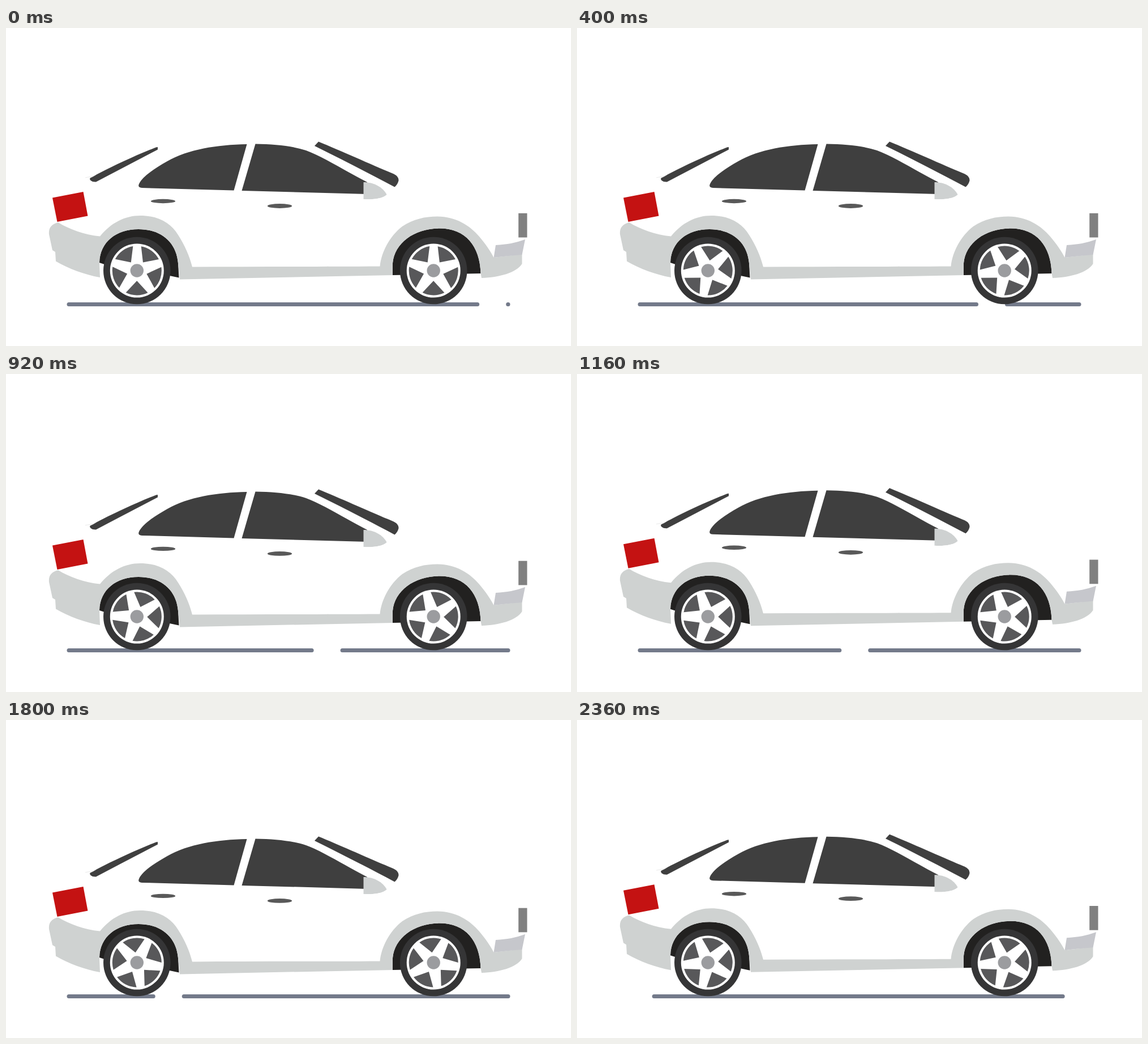
Recreate the animation shown at these times as an HTML page. Size 998x561 px, loop 2400 ms.

```html
<!DOCTYPE html>
<html lang="en">
<head>
<meta charset="utf-8">
<title>Driving car</title>
<style>
  html, body { margin: 0; width: 100%; height: 100%; overflow: hidden; background: #fff; }
  svg { display: block; width: 100%; height: 100%; }
</style>
</head>
<body>
<svg viewBox="0 0 998 561" preserveAspectRatio="none">
  <g stroke="#737a8a" stroke-width="7" stroke-linecap="round">
    <line class="road" y1="487.5" y2="487.5"/>
    <line class="road" y1="487.5" y2="487.5"/>
  </g>

  <g id="body">
    <!-- wheel arches -->
    <g fill="#222120">
      <path d="M165 414C166 377 195 355 234 355C274 355 301 378 304 415L305.500 440.500L289 437L174 417Z"/>
      <path d="M683 436V415C686 379 722 353.500 766 353.500C812 353.500 837 385 838.500 433Z"/>
    </g>
    <!-- bumpers and sill -->
    <path fill="#cfd2d1" d="M92 343C112 355 138 365 166 367.500C185 344 210 331 237 331C270 331 292 345 304 365
      C316 384 324 402 329 421.500C440 421 560 421 660.500 420.500C663 395 678 367 700 350C720 337 740 332.500 762 332.500
      C795 332.500 820 349 836 368C848 382 856 394 861.500 405L911.500 399V416C901 432 871 440 840 441L838.500 433
      C837 385 812 353.500 766 353.500C722 353.500 686 379 683 415V436L307 443.500L304 415C301 378 274 355 234 355
      C195 355 166 377 165 414L166 440C138 435 112 425 88 411.500L87 395L82 392L76 364C75 353 80 346 92 343Z"/>
    <path fill="#c6c7cc" d="M865 383C885 382 900 379 917 373L911.500 400Q885 402 861.500 405Z"/>

    <!-- windows -->
    <path fill="none" stroke="#e2e2e2" stroke-width=".8" d="M140 264L156 261"/>
    <g fill="#3f3f3f">
      <path d="M149 264.500Q155 262 160 258.500C190 243 228 225 265 210.500L268 210V214.500L159 271.500Q153 272 149.500 269Q147 266 149 264.500Z"/>
      <path d="M425.500 205C372 206 322 214 285 235C262 248 241 262 235 275Q232 281.500 240 282L402.500 286.500Z"/>
      <path d="M440.500 204.500C475 205 505 208 530 216C560 227 597 251 638 272V293L416.500 287Z"/>
      <path d="M545 208L552 200.500C590 216 650 243 685 257.500Q694 262 693.500 269Q692 276 686.500 280.500C640 256 590 230 545 208Z"/>
    </g>
    <path fill="#ced1d1" d="M631.500 272C650 272 666 281 672.500 294C666 301 648 303 631.500 302Z"/>
    <path fill="#fff" d="M631.500 302C648 303 666 301 672.500 294V306H631.500Z"/>

    <!-- handles and lamps -->
    <g fill="#595959">
      <ellipse cx="277.500" cy="305.500" rx="21.700" ry="3.700"/>
      <ellipse cx="483.500" cy="314" rx="21.700" ry="3.900"/>
    </g>
    <path fill="#c41212" d="M82 299.500L136.500 289L144.500 331.500L90.500 342Z"/>
    <rect fill="#808080" x="905.200" y="326.800" width="15.300" height="42.700"/>
  </g>

  <g id="wheels"></g>
</svg>
<script>
const LOOP = 2400;     // visible loop, ms
const CYCLE = 2440;    // full turn of road and wheels, ms
const BOUNCE = 404.5;  // suspension period, ms
const ROAD = { left: 111, length: 776, dash: 722 };

const body = document.getElementById('body');
const roads = [...document.querySelectorAll('.road')];
const polar = (r, deg) => {
  const a = deg * Math.PI / 180;
  return (r * Math.sin(a)).toFixed(2) + ' ' + (-r * Math.cos(a)).toFixed(2);
};

function wheel(x) {
  let cuts = '';
  for (let i = 0; i < 5; i++) {
    const mid = 36 + 72 * i;
    cuts += `M${polar(18, mid)}L${polar(43.5, mid - 26.5)}A43.5 43.5 0 0 1 ${polar(43.5, mid + 26.5)}Z`;
  }
  return `<g transform="translate(${x} 428)">
    <circle r="59.300" fill="#353536"/>
    <circle r="47.500" fill="#fff"/>
    <path class="rim" d="${cuts}" fill="#58585a"/>
    <circle r="11.700" fill="#9b9c9f"/>
  </g>`;
}
document.getElementById('wheels').innerHTML = wheel(231.3) + wheel(755.2);
const rims = [...document.querySelectorAll('.rim')];

function setDash(line, start) {
  const a = Math.max(0, start);
  const b = Math.min(ROAD.length, start + ROAD.dash);
  line.setAttribute('visibility', b - a > 0.01 ? 'visible' : 'hidden');
  line.setAttribute('x1', ROAD.left + a);
  line.setAttribute('x2', ROAD.left + b);
}

function draw(t) {
  const p = t / CYCLE;
  const drop = 2.5 * (1 - Math.cos(2 * Math.PI * t / BOUNCE));
  body.setAttribute('transform', `translate(0 ${drop.toFixed(3)})`);
  rims.forEach(r => r.setAttribute('transform', `rotate(${(720 * p).toFixed(3)})`));
  roads.forEach((line, i) => setDash(line, ROAD.length * (i - p)));
}

const begin = performance.now();
function tick() {
  draw((performance.now() - begin) % LOOP);
  requestAnimationFrame(tick);
}
draw(0);
requestAnimationFrame(tick);
</script>
</body>
</html>
```
